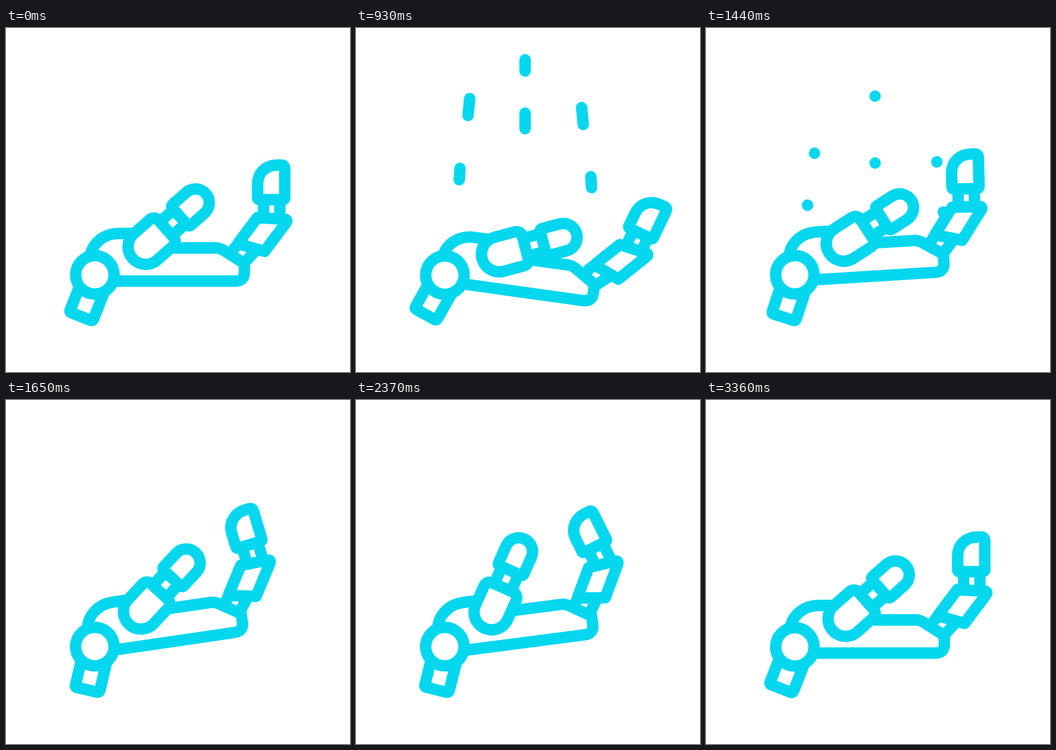
An HTML page that plays this animation: 596 by 596 pixels, repeating every 3.6 s.

```html
<!DOCTYPE html>
<html lang="en">
<head>
<meta charset="utf-8">
<title>Robotic hand</title>
<style>
html, body { margin: 0; width: 100%; height: 100%; overflow: hidden; background: #fff; }
svg { display: block; width: 100vw; height: 100vh; }
</style>
</head>
<body>
<svg viewBox="0 0 596 596" fill="none" stroke="#05d7ee" stroke-width="19.8" stroke-linecap="round" stroke-linejoin="round">
  <g id="hand">
    <path d="M125.5 452.5L111.500 488Q109.500 492 113.500 493.500L147 506.500Q150.500 507.500 152 503.500L168.400 462"/>
    <path d="M147 390C152 372 170 356 195 356H230"/>
    <path d="M278 381H364Q371 381 380 387L413 408V423Q413 438.500 397 438.500H186"/>
    <circle cx="154" cy="427.700" r="33.300" fill="#fff"/>
    <g id="finger">
      <path d="M394 384L401 375M415 405L433 385"/>
      <path d="M403.500 371Q403 374 406 375L448 387L485.500 337Q488.500 332 483 331.300L435.500 328.500Z" fill="#fff"/>
      <g id="tip">
        <path d="M446.300 300V327M474.500 300V327"/>
        <path d="M436 294V270C436 251 450 237.500 470 237.500H477Q483 237.500 483 244V294Q483 297.500 479 297.500H440Q436 297.500 436 294Z" fill="#fff"/>
      </g>
    </g>
    <g id="thumb">
      <!-- upright thumb, base centre at 0,0 -->
      <path d="M-16 -52V-78M16 -52V-78"/>
      <path d="M-30.500 0V-35Q-30.500 -47 -18.500 -47H18.500Q30.500 -47 30.500 -35V0A30.500 30.500 0 0 1 -30.500 0Z" fill="#fff"/>
      <path d="M-24 -115V-84Q-24 -79 -19 -79H19Q24 -79 24 -84V-115A24 24 0 0 0 -24 -115Z" fill="#fff"/>
    </g>
  </g>
  <g id="rain"></g>
</svg>
<script>
const LOOP = 3600, STEP = 30;
const el = id => document.getElementById(id);
const hand = el('hand'), finger = el('finger'), tip = el('tip'), thumb = el('thumb'), rain = el('rain');
const clamp = v => Math.max(0, Math.min(1, v));
const ease = p => (1 - Math.cos(Math.PI * clamp(p))) / 2;

// rest -> high -> low -> rest, at the four given times
function swing(t, [a, b, c, d], high, low) {
  if (t < b) return high * ease((t - a) / (b - a));
  if (t < c) return high + (low - high) * ease((t - b) / (c - b));
  return low * (1 - ease((t - c) / (d - c)));
}

// falling streaks: x1, y1, x2, y2
const streaks = [
  [293, 35, 293, 118],
  [293, 120, 293, 234],
  [199.8, 92, 188, 217],
  [181.5, 223, 176, 307],
  [388, 108, 400, 232],
  [405.5, 238, 411, 319]
].map(s => {
  const line = document.createElementNS('http://www.w3.org/2000/svg', 'line');
  rain.appendChild(line);
  return { s, line };
});

function drawRain(t) {
  const on = t >= 720 && t < 1470;
  rain.setAttribute('display', on ? 'inline' : 'none');
  if (!on) return;
  const head = clamp((t - 720) / 440);
  const tail = Math.min(0.999, clamp((t - 768) / 672));
  for (const { s: [x1, y1, x2, y2], line } of streaks) {
    const put = (n, p) => {
      line.setAttribute('x' + n, x1 + (x2 - x1) * p);
      line.setAttribute('y' + n, y1 + (y2 - y1) * p);
    };
    put(1, tail);
    put(2, head);
  }
}

function draw(t) {
  const palm = swing(t, [0, 750, 1950, 3000], 9, -11.3);
  const bend = swing(t, [120, 870, 2070, 3240], 6.8, -10.8);
  const curl = swing(t, [240, 960, 2160, 3360], 11, -10.7);
  const grip = swing(t, [120, 1080, 2280, 3360], 20, -17.3);
  const slide = Math.max(0, curl);
  hand.setAttribute('transform', `rotate(${palm} 151 428)`);
  finger.setAttribute('transform', `rotate(${bend} 397 430)`);
  tip.setAttribute('transform', `translate(${slide * 0.15} ${slide * 0.3}) rotate(${curl} 460 318)`);
  thumb.setAttribute('transform', `translate(242 379) rotate(${48.5 + grip})`);
  drawRain(t);
}

const start = performance.now();
function tick() {
  const t = (performance.now() - start) % LOOP;
  draw(Math.floor(t / STEP) * STEP);
  requestAnimationFrame(tick);
}
tick();
</script>
</body>
</html>
```
